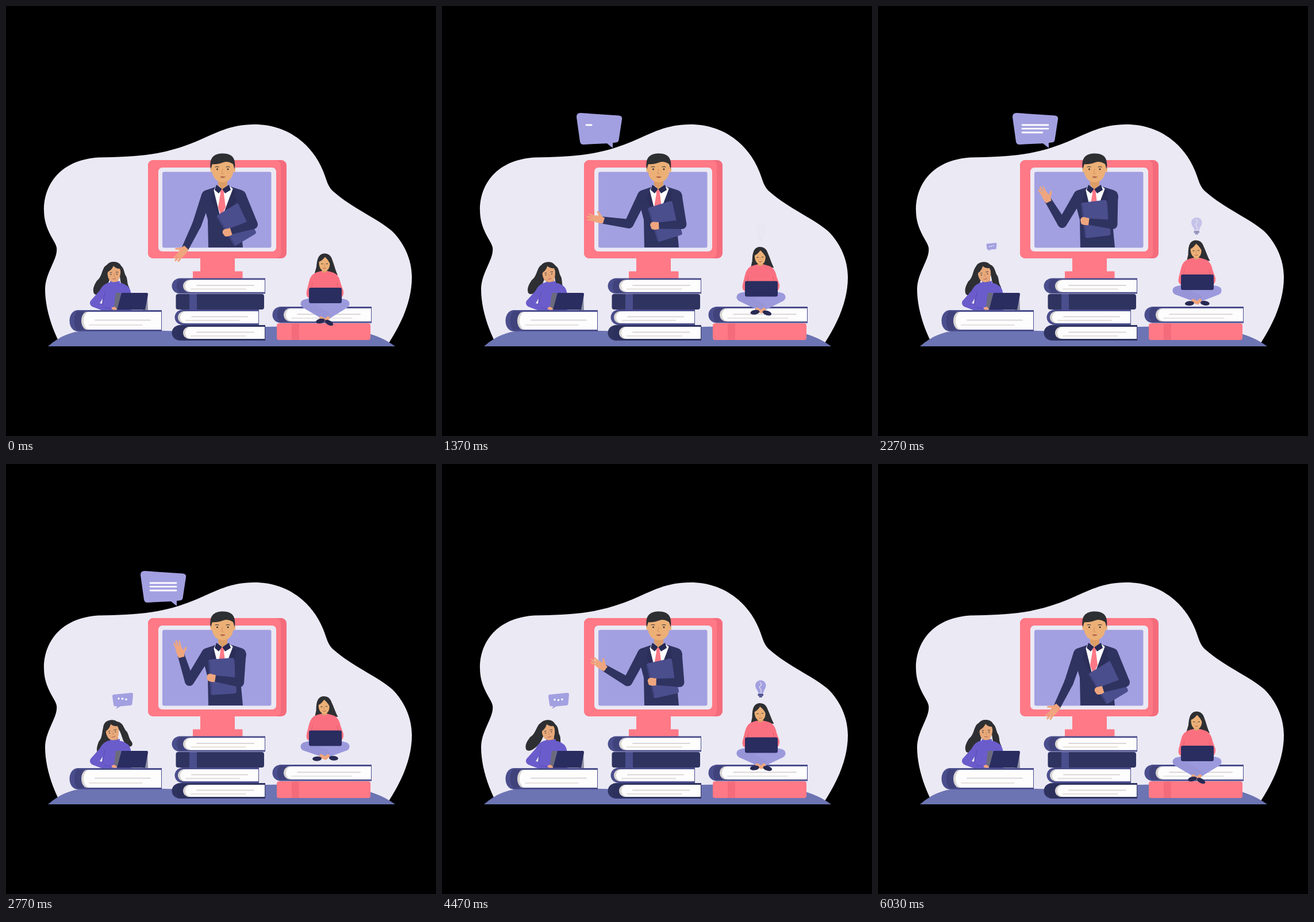
Recreate the animation shown at these times as an HTML page. Size 748x748 px, loop 6.06 s.

```html
<!DOCTYPE html>
<html lang="en">
<head>
<meta charset="utf-8">
<title>Online lesson</title>
<style>
html, body { margin: 0; width: 100%; height: 100%; overflow: hidden; background: #000; }
svg { display: block; width: 100vw; height: 100vh; }
</style>
</head>
<body>
<svg id="stage" viewBox="0 0 748 748"></svg>
<script>
const LOOP = 6060;
const C = {
  blob: '#ebe9f4', ground: '#6c74b3', pink: '#ff7986', rose: '#f46c7c', lilac: '#a3a0e1',
  navy: '#2f3360', dark: '#272a52', screen: '#2a2d60', indigo: '#4b4e8d', skin: '#ecb077', hand: '#efa67e',
  hair: '#2e2f32', violet: '#6a5ccb', legs: '#9c9add', white: '#fdfdfe', line: '#dcd6d8'
};

const path = (d, fill, more = '') => `<path d="${d}" fill="${fill}" ${more}/>`;
const rect = (x, y, w, h, fill, r = 0) =>
  `<rect x="${x}" y="${y}" width="${w}" height="${h}" rx="${r}" fill="${fill}"/>`;
const dot = (x, y, rx, fill, ry = rx) => `<ellipse cx="${x}" cy="${y}" rx="${rx}" ry="${ry}" fill="${fill}"/>`;
const stroke = (d, color, w) =>
  `<path d="${d}" fill="none" stroke="${color}" stroke-width="${w}" stroke-linecap="round" stroke-linejoin="round"/>`;
const group = (id, body) => `<g id="${id}">${body}</g>`;

// Open book lying on its side, spine at the left.
function book(x, y, w, h, color, inset = 20) {
  const leaf = (gap, fill) => {
    const l = x + gap, t = y + 3, b = y + h - 3;
    return path(`M${x + w - 1} ${t}H${l + 9}C${l - 3} ${t + 3} ${l - 3} ${b - 3} ${l + 9} ${b}H${x + w - 1}Z`, fill);
  };
  const m = y + h / 2;
  return path(`M${x + w} ${y}H${x + 14}C${x - 4} ${y + 2} ${x - 4} ${y + h - 2} ${x + 14} ${y + h}H${x + w}Z`, color) +
    path(`M${x + 14} ${y + 2}C${x + 7} ${y + 7} ${x + 7} ${y + h - 7} ${x + 14} ${y + h - 2}H${x + 25}V${y + 2}Z`, C.dark, 'opacity=".3"') +
    leaf(inset, '#d9d5d3') + leaf(inset + 4, C.white) +
    stroke(`M${x + inset + 24} ${m - 1}H${x + w - 20}`, C.line, 1.8) +
    stroke(`M${x + inset + 14} ${m + h * .2}H${x + w - 34}`, '#e2dcd8', 1.6);
}

const scenery =
  path('M90 580C76 550 68 520 68 492C69 462 91 440 88 420C86 408 66 390 66 355C66 310 95 268 160 263.500C215 262 265 263 330 236C365 221 390 206 432 206C494 206 535 245 552 288C558 303 560 316 571 324C600 350 650 372 672 392C692 412 706 440 706 472C706 515 686 555 666 586Z', C.blob) +
  path('M73 592C97 572 116 564 160 563C240 562 260 566 300 565C370 558 500 556 560 559C610 563 646 569 677 592Z', C.ground);

const monitor =
  rect(338, 432, 60, 34, C.pink) + rect(325, 461.5, 86.5, 13, C.pink, 1) +
  rect(247, 268, 241, 171, C.rose, 9) + rect(247, 268, 231, 171, C.pink, 9) +
  rect(265, 281, 205, 146, C.blob, 7) + rect(272, 288.5, 189.5, 132, C.lilac, 3);

const books =
  book(288, 555, 163, 27, C.navy) + book(293, 528, 147, 27, C.indigo, 6) +
  rect(295.5, 501, 153.5, 27, C.navy, 4) + rect(319, 501, 13, 27, C.indigo) +
  book(288, 473.5, 163, 27, C.indigo) + book(110, 529, 161, 37, C.indigo, 21) +
  rect(471, 552, 163, 29, C.pink, 4) + rect(497, 552, 13, 29, C.rose) +
  book(463, 523, 173, 28.5, C.indigo);

const teacherBody =
  path('M364 315L346 321Q339 324 341 334L351 372L352 420H412L409 388L418 331Q417 323 409 320L390 314Z', C.navy) +
  path('M365 314H390L396 319Q391 345 374 368Q362 345 361 321Z', C.white) +
  path('M372 319H379L379 326L382 350L374 365L369 350L373 326Z', C.pink) +
  path('M366 311L376 318L388 311L391 320L381 326L376 318L370 326L363 320Z', C.dark) +
  path('M361 319L356 338L373 368Z', '#2b2e58') + path('M395 317L404 335L375 370Z', '#2b2e58') +
  path('M369 298H385V312L376 319L369 311Z', '#dd9d66') +
  path('M357.500 273C357 292 361 306 377 306.500C393 306 397 292 396.500 273L385 264H366Z', C.skin) +
  dot(357.5, 285, 2, C.skin, 4) + dot(397, 285, 2, C.skin, 4) +
  path('M356 284C353 264 361 256.500 378 256.500C395 257 400 266 398 284L395 275Q386 269 378 272Q367 276 359 275Z', C.hair) +
  stroke('M364 280Q367 278.500 370 280M383 280Q386 278.500 389 280', C.hair, 1) +
  group('eyes', dot(367.5, 284, 1.4, C.hair) + dot(386, 284, 1.4, C.hair)) +
  group('lids', stroke('M365 283.500H370M383.500 283.500H388.500', C.hair, 1)) +
  stroke('M377 284L375 291.500L378 292', '#cf8f59', 1) +
  path('M372 297Q377 295.500 382 297Q377 301.500 372 297Z', '#b0674a');

const palm = path('M-4 -5C4 -7 9 -7 13 -6.500L23 -8Q25 -6.500 23 -5L15 -3L26 -3.500Q28 -2 26 -.5L16 .5L25 2.500Q26 4 24 4.500L14 4L7 6L12 11Q12 13.500 9 12.500L1 6L-4 5Z', C.hand);

const student =
  path('M179 481Q168 484 163 495L147 513Q144 519 150 523L166 529H218L217 497Q215 486 201 482Z', C.violet) +
  path('M168 509L163 517L167 518Z', C.blob) +
  stroke('M172 498L168 520M170 524L185 527', '#594cb4', 1) +
  path('M183 472H195V483Q189 487 183 483Z', '#d6966c') +
  path('M181 478Q189 482 198 478V487Q189 491 181 487Z', C.violet);

const studentHair =
  path('M180 449C165 451 170 469 158 478C153 486 150 493 153 500C157 505 165 500 171 493C179 485 181 472 184 460Z', C.hair) +
  path('M192 449C207 451 204 463 209 470C212 477 210 482 214 489C217 496 210 501 204 492C197 484 201 470 194 460Z', C.hair);

const studentHead =
  path('M176.500 460C176 474 180 479.500 187.500 480.500C196 479.500 199.500 473 199.500 457L188 449Z', '#e8a97a') +
  path('M174 468C170 453 177 445 187 445C198 445 204 452 203 469Q199 463 198 457Q191 457 187 452Q184 459 178 462Z', C.hair) +
  stroke('M181 464L184 463.500M191 463L195 463', C.hair, .8) +
  dot(182.5, 467, .9, C.hair) + dot(193, 466.500, .9, C.hair) +
  stroke('M188 466L188.500 471', '#c58259', .8) + stroke('M185.500 474.500Q188.500 476 191 474', '#b05c50', 1);

const studentLaptop =
  dot(189, 526, 5.5, C.hand, 2.7) +
  path('M191 499H200L195 529L188 522Z', '#6b6b7d') + path('M246 500L247 529H238Z', '#8e90a3') +
  path('M201 499H245Q247 499 247 502L242 528.500H193Z', C.screen);

const readerBody =
  path('M541 463Q554 458 567 463Q579 466 582 482L587 496Q588 507 580 508H528Q521 506 523 496L527 480Q530 466 541 463Z', '#fb7080') +
  stroke('M533 482L531 493M576 482L578 493', '#df5b70', 1);

const readerHair =
  path('M554 430.500C542 431 541 444 540 454L536 468L552 466L577 468C573 460 571 450 568 443C566 435 562 431 554 430.500Z', C.hair);

const readerHead =
  path('M549.500 456H558.500V462Q554 466 549.500 462Z', '#dfa06c') +
  path('M544.500 444C544 455 548 460.500 554 461C561 460.500 564 455 563.500 443L554 435Z', C.skin) +
  path('M542.500 453C541 440 546 431.500 554 431.500C563 431.500 566 441 565.500 453Q562 443 555 436.500Q550 443 544.500 445Z', C.hair) +
  stroke('M548.500 448.500H551M557 448.500H559.500', C.hair, .9) +
  stroke('M554 449V453', '#cf8f59', .8) + stroke('M551.500 456Q554 457.500 556.500 456', '#b05c50', 1);

const bulb =
  path('M550 413C550 408 545 406 545 399A9.300 9.300 0 0 1 563.500 399C563.500 406 559 408 559 413Z', C.lilac) +
  stroke('M553 394L556 398L552 403L555 407V412', C.blob, 1.1) +
  rect(549.5, 414, 9.5, 4, C.indigo, 1) + rect(551.5, 418, 5.5, 2.5, C.indigo, 1);

const talk = path('M241 186L307 190.500Q314 191 313 197L307.500 233Q307 237 302 237.500L297 238V247L287 239L246 241Q241 241 240 236L234 193Q234 186 241 186Z', C.lilac) +
  [207, 213.3, 220].map(y => `<line class="row" x1="251" y1="${y}" y2="${y}" stroke="${C.white}" stroke-width="2.800" stroke-linecap="round"/>`).join('');

const chat = path('M188 401L218 398Q221 398 221 401L219.500 417Q219 420 216 420L199 421.500L191.500 426L193.500 421.500L190 421.500Q187 421 187 418L185 404Q185 401 188 401Z', C.lilac) +
  [196, 202.5, 209].map(x => `<circle class="dot" cx="${x}" r="1.800" fill="${C.white}"/>`).join('');

const stage = document.getElementById('stage');
stage.innerHTML = scenery + monitor + books +
  teacherBody + group('arm', '') + group('palm', palm) +
  group('folder', rect(-22.5, -31, 45, 62, C.indigo, 4) + stroke('M-21 -27V27', '#3d407b', 1.5)) +
  group('holdArm', '') + group('grip', path('M7 -6L-3 -7Q-8 -6 -8 -1L-6 5Q-2 8 7 6Z', C.hand)) +
  group('locks', studentHair) + student + group('head', studentHead) + studentLaptop +
  group('reader', group('bulb', bulb) + group('readerHair', readerHair) + readerBody +
    group('readerHead', readerHead) + group('seat', '') + rect(527, 490, 57, 27, C.screen, 3)) +
  group('talk', talk) + group('chat', chat);

const el = Object.fromEntries([...stage.querySelectorAll('[id]')].map(n => [n.id, n]));
const rows = stage.querySelectorAll('.row');
const dots = stage.querySelectorAll('.dot');

// Smooth curve through [time, value] keys, without overshoot.
function curve(keys) {
  const n = keys.length - 1;
  const slope = keys.slice(1).map((k, i) => (k[1] - keys[i][1]) / (k[0] - keys[i][0]));
  const tangent = keys.map((_, i) => {
    const a = slope[i - 1], b = slope[i];
    return i && i < n && a * b > 0 ? 2 * a * b / (a + b) : 0;
  });
  return t => {
    if (t <= keys[0][0]) return keys[0][1];
    if (t >= keys[n][0]) return keys[n][1];
    const i = keys.findIndex(k => k[0] > t) - 1;
    const [t0, v0] = keys[i], [t1, v1] = keys[i + 1], d = t1 - t0, u = (t - t0) / d;
    const s = u * u * (3 - 2 * u);
    return v0 + (v1 - v0) * s + d * u * (1 - u) * (tangent[i] * (1 - u) - tangent[i + 1] * u);
  };
}

const raise = curve([[0, 0], [930, .31], [1830, .74], [2770, .995], [3100, 1], [3830, .97], [4470, .69], [LOOP, 0]]);
const sway = curve([[0, 0], [930, 0], [1830, -6], [2770, 7], [3830, 5], [4470, -7], [LOOP, 0]]);
const tilt = curve([[700, 0], [1700, 1], [4600, 1], [5700, 0]]);
const talkSize = curve([[680, 0], [930, .9], [1100, 1.03], [1250, 1], [3840, 1], [3980, 1.03], [4280, 0]]);
const chatSize = curve([[2150, 0], [2400, 1.05], [2520, 1], [4900, 1], [5000, 1.05], [5250, 0]]);
const glow = curve([[1350, 0], [1600, 1], [2150, 1], [2400, 0], [4050, 0], [4300, 1], [4900, 1], [5150, 0]]);

const mix = (a, b, p) => a + (b - a) * p;
const mixPt = (a, b, p) => [mix(a[0], b[0], p), mix(a[1], b[1], p)];
const place = (node, value) => node.setAttribute('transform', value);
const show = (node, on) => node.setAttribute('visibility', on ? 'visible' : 'hidden');
const DEG = Math.PI / 180;

// Tapered limb with a round start.
function limb(a, b, wa, wb) {
  const r = Math.atan2(b[1] - a[1], b[0] - a[0]);
  const edge = (p, w) => `${p[0] - Math.sin(r) * w / 2} ${p[1] + Math.cos(r) * w / 2}`;
  return path(`M${edge(a, wa)}L${edge(b, wb)}L${edge(b, -wb)}L${edge(a, -wa)}Z`, C.navy) +
    dot(a[0], a[1], wa / 2, C.navy);
}

function drawTeacher(t) {
  const p = raise(t);
  const elbow = mixPt([332, 380], [319, 378], p);
  const angle = mix(116, 253, p);
  const wrist = [elbow[0] + 48 * Math.cos(angle * DEG), elbow[1] + 48 * Math.sin(angle * DEG)];
  el.arm.innerHTML = limb([349, 330], elbow, 18, 16) + limb(elbow, wrist, 16, 12);
  place(el.palm, `translate(${wrist}) rotate(${angle + mix(18, 3, p)})`);

  place(el.folder, `translate(${mixPt([401, 380], [376.5, 369.5], p)}) rotate(${mix(-31, -4, p)})`);
  const bend = mixPt([430, 380], [406, 380], p);
  const cuff = mixPt([391, 392], [363, 373], p);
  el.holdArm.innerHTML = limb([408, 330], bend, 19, 16) + limb(bend, cuff, 16, 11);
  const turn = Math.atan2(bend[1] - cuff[1], bend[0] - cuff[0]) / DEG;
  place(el.grip, `translate(${mixPt([385, 394], [357, 372], p)}) rotate(${turn})`);

  const blink = Math.abs(t - 930) < 90;
  show(el.eyes, !blink);
  show(el.lids, blink);
}

function drawStudent(t) {
  const lean = tilt(t);
  place(el.head, `rotate(${-9 * lean} 188 483)`);
  place(el.locks, `translate(${-2 * lean} 0) rotate(${-1.2 * (sway(t) + 2 * lean)} 186 452)`);
}

function drawReader(t) {
  const g = (1 - Math.cos(2 * Math.PI * t / LOOP)) / 2;
  place(el.reader, `translate(0 ${-27 * g})`);
  const nod = `rotate(${-4 * tilt(t)} 554 460)`;
  place(el.readerHair, nod);
  place(el.readerHead, nod);
  const y = 543 - 9 * g;
  const shoe = (a, b, r) => `<g transform="translate(${mixPt(a, b, g)}) rotate(${mix(r, r * .2, g)})">${dot(0, 0, 8, C.dark, 4)}</g>`;
  el.seat.innerHTML =
    path(`M528 508H582L558 ${y}H553Z`, C.legs) +
    stroke(`M566 512L590 518L556 ${y - 4}`, C.legs, 15) +
    stroke(`M544 512L520 518L556 ${y - 4}`, '#9795d8', 15) +
    stroke(`M548 ${y}L553 ${y + 3}M560 ${y}L556 ${y + 4}`, C.hand, 6) +
    shoe([547, 548], [541, 539], -14) + shoe([562, 551], [570, 538], 28);
  el.bulb.setAttribute('opacity', glow(t));
}

function drawBubbles(t) {
  const k = talkSize(t), off = Math.max(0, 1 - k);
  place(el.talk, `translate(${297 + 50 * off} ${247 + 80 * off}) rotate(${-50 * off}) scale(${k}) translate(-297 -247)`);
  rows.forEach((row, i) => {
    const u = Math.min(1, Math.max(0, (t - 1300 - 350 * i) / 350));
    row.setAttribute('x2', 251 + 45 * u);
    show(row, u > 0);
  });
  place(el.chat, `translate(192 426) scale(${chatSize(t)}) translate(-192 -426)`);
  dots.forEach((d, i) => d.setAttribute('cy', 409.5 - .4 * i + 1.5 * Math.sin(t / 160 - i * 1.1)));
}

function draw(now) {
  const t = now % LOOP;
  drawTeacher(t);
  drawStudent(t);
  drawReader(t);
  drawBubbles(t);
}

const start = performance.now();
function tick() {
  draw(performance.now() - start);
  requestAnimationFrame(tick);
}
tick();
</script>
</body>
</html>
```
